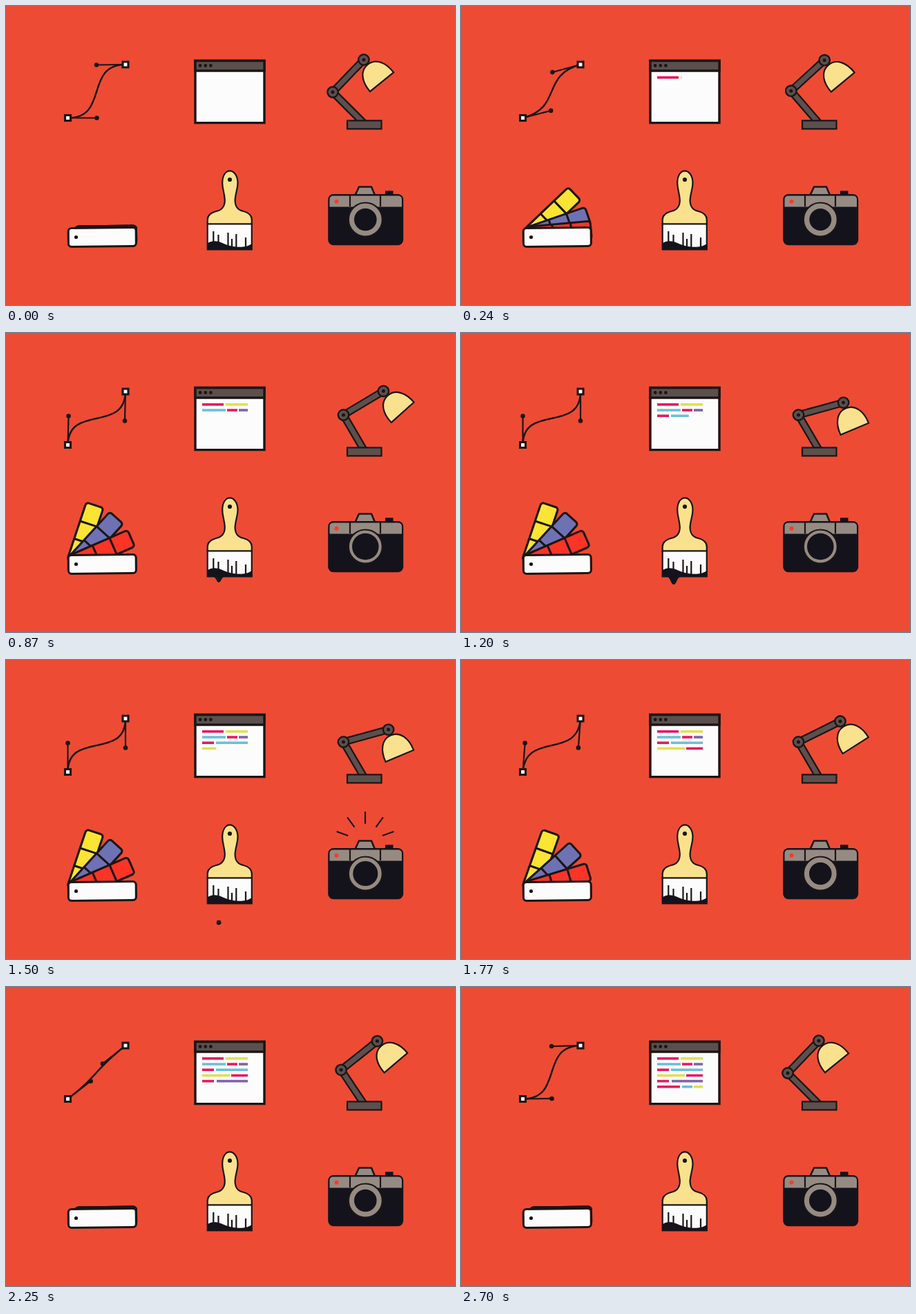
Recreate the animation shown at these times as an HTML page. Size 650x434 px, loop 3 s.

```html
<!DOCTYPE html>
<html lang="en">
<head>
<meta charset="utf-8">
<title>Design tools</title>
<style>
  html, body { margin: 0; height: 100%; overflow: hidden; background: #ee4b34; }
  svg { display: block; width: 650px; height: 434px; }
  .line { fill: none; stroke: #1b1516; stroke-width: 2.2; }
  .ink { fill: #1b1516; }
  .black { fill: #14131c; }
  .white { fill: #fcfcfc; }
  .iron { fill: #5b504d; }
  .cream { fill: #f9e18e; }
  .steel { fill: #968b82; }
  .bold { stroke-width: 3.1; }
</style>
</head>
<body>
<svg viewBox="0 0 650 434">
  <g class="line">
    <path id="curve" stroke-width="2.5"/>
    <path id="handles"/>
    <circle id="endA" class="ink" r="2.2"/>
    <circle id="endB" class="ink" r="2.2"/>
    <path class="white bold" d="M85.5 158.5h8v8h-8zM169 81h8v8h-8z"/>
  </g>

  <g class="line">
    <path class="white" stroke-width="3.4" d="M274 79.5H374V169.6H274z"/>
    <path class="iron" stroke-width="3.4" d="M274 79.5H374V94H274z"/>
    <path class="ink" stroke="none" d="M278.7 86.5a2.4 2.4 0 0 1 4.8 0a2.4 2.4 0 0 1-4.8 0m7.7 0a2.4 2.4 0 0 1 4.8 0a2.4 2.4 0 0 1-4.8 0m7.6 0a2.4 2.4 0 0 1 4.8 0a2.4 2.4 0 0 1-4.8 0"/>
    <g id="code" stroke="none"></g>
  </g>

  <g class="line">
    <path id="shade" class="cream" d="M-22 41.5C-22.5 23-14.5 9 0 9S22.500 23 22 41.500Z"/>
    <path id="armEdge" stroke-width="11.5"/>
    <path id="armFill" stroke="#5b504d" stroke-width="7"/>
    <path class="iron" d="M494 166.3h49.5v12H494z"/>
    <g id="elbow"><circle class="iron" r="7.7" stroke-width="2.4"/><circle class="ink" r="2.5" stroke="none"/></g>
    <g id="wrist"><circle class="iron" r="7.7" stroke-width="2.4"/><circle class="ink" r="2.5" stroke="none"/></g>
  </g>

  <g class="line bold">
    <g id="swatches"></g>
    <rect class="white" x="90.3" y="322" width="98" height="27" rx="4.5" transform="rotate(-.6 139 335)"/>
    <circle class="ink" cx="101.5" cy="335.5" r="2.6" stroke="none"/>
  </g>

  <g class="line">
    <path class="cream" d="M291.7 316.5V310C291.7 303 297 300 304 298C314 296 317 290 316.8 281C316 270 313.2 266 313.2 257C313.2 246 318 239.3 324 239.3S335.5 246 335.5 257C335.5 266 332.5 270 331.6 281C331.4 290 334 296 344 298C351 300 355.8 303 355.8 310V316.5z"/>
    <circle class="ink" cx="324" cy="252" r="3.1" stroke="none"/>
    <path class="white" d="M291.7 316.5H355.8V353.5H291.7z"/>
    <path d="M300.3 327v20M307.5 332v14M321.5 329v20M327 338v12M333.3 331v20M347 336v16"/>
    <path class="black" stroke="none" d="M291.5 344.5C298 340 305 340.5 312 343.5S325 349 333 349.5S349 350 356 345V354H291.5z"/>
    <path id="drip" class="black" stroke="none"/>
    <circle id="drop" class="black" cx="308" stroke="none"/>
  </g>

  <g class="line">
    <path id="flash"/>
    <path class="black" d="M549 268.2h11.5v6H549z" stroke="none"/>
    <path class="steel" stroke-width="2.6" d="M511 262.5H529L534 274.5H505.5z"/>
    <rect class="black" x="466.2" y="273" width="109" height="74.3" rx="8" stroke="none"/>
    <path class="steel" stroke="none" d="M468.5 291.5V281q0-5.5 5.5-5.5H567.5q5.500 0 5.500 5.500V291.500z"/>
    <path d="M498 274V291M542 274V291"/>
    <circle cx="478.5" cy="283.7" r="3" fill="#ff3a26" stroke="none"/>
    <circle class="steel" cx="520.3" cy="310" r="24.5"/>
    <circle id="lens" class="black" cx="520.3" cy="310" stroke="none"/>
  </g>
</svg>
<script>
const $ = id => document.getElementById(id);
const set = (id, attrs) => { for (const k in attrs) $(id).setAttribute(k, attrs[k]); };
const clamp = x => Math.min(1, Math.max(0, x));
const RAD = Math.PI / 180;
const polar = (x, y, r, deg) => [x + r * Math.cos(deg * RAD), y - r * Math.sin(deg * RAD)];

const M = '#e8185e', Y = '#e0e052', C = '#6cc0d8', P = '#8062aa';
const rows = [
  [[M, 284, 315], [Y, 318, 350]],
  [[C, 284, 318], [M, 320, 335], [P, 337, 350]],
  [[M, 284, 301], [C, 304, 350]],
  [[Y, 284, 324], [M, 326, 350]],
  [[M, 284, 301], [P, 305, 350]],
  [[M, 284, 317], [C, 320, 335], [Y, 337, 350]]
];
const swatches = [['#fce434', 71], ['#6e72b4', 47], ['#fb3426', 23]];

$('swatches').innerHTML = swatches.map(([color], i) =>
  `<g id="swatch${i}"><rect y="-13" width="87.5" height="26" rx="4" fill="${color}"/><path d="M32-13v26M59-13v26"/></g>`).join('');

function draw(t) {
  const ease = (from, to) => { const u = clamp((t - from) / (to - from)); return u * u * (3 - 2 * u); };

  // Vector handles: the curve pulls further than the visible handle
  const turn = 90 * (ease(0, 940) - ease(1620, 2760));
  const handle = r => [polar(89.5, 162.5, r, turn), polar(173, 85.5, r, 180 + turn)];
  const [a, b] = handle(42), [pullA, pullB] = handle(60);
  set('curve', { d: `M89.5 162.5C${pullA} ${pullB} 173 85` });
  set('handles', { d: `M89.5 162.5L${a}M173 85L${b}` });
  set('endA', { cx: a[0], cy: a[1] });
  set('endB', { cx: b[0], cy: b[1] });

  // Code lines
  $('code').innerHTML = rows.map((row, i) => {
    const caret = 284 + 66 * clamp((t - 30 - 450 * i) / 390);
    return row.filter(s => s[1] < caret).map(([color, x, end]) =>
      `<rect x="${x}" y="${102 + 8.2 * i}" width="${Math.min(end, caret) - x}" height="3.6" fill="${color}"/>`).join('');
  }).join('');

  // Lamp
  const lean = ease(0, 650) - ease(2055, 2700);
  const lower = ease(0, 750) - ease(1800, 2700);
  const dip = ease(870, 1200);
  const elbow = [473 + 15.5 * lean, 125 - 6 * lean];
  const wrist = polar(...elbow, 65 + 2.5 * lean, 46.3 - 15.4 * lower - 15.5 * (dip - ease(1500, 1920)));
  const tilt = -39 - 3 * lower + 19 * (dip - ease(1500, 2040));
  const arm = `M518.5 170.5L${elbow}L${wrist}`;
  set('armEdge', { d: arm });
  set('armFill', { d: arm });
  set('elbow', { transform: `translate(${elbow})` });
  set('wrist', { transform: `translate(${wrist})` });
  set('shade', { transform: `translate(${wrist}) rotate(${tilt})` });

  // Colour fan
  swatches.forEach(([, angle], i) => {
    const shut = 1740 - 60 * i;
    const open = ease(60 * i, 60 * i + 420) - ease(shut, shut + 420);
    set('swatch' + i, { transform: `translate(101 333) rotate(${-0.6 - angle * open})` });
  });

  // Paint drip
  const sag = ease(570, 1020) - ease(1260, 1440), w = 4 + 8 * sag, tip = 353 + 12 * sag;
  set('drip', { d: `M${308 - w} 353C${308 - w * .3} 354 ${308 - w * .4} ${tip} 308 ${tip}S${308 + w * .3} 354 ${308 + w} 353z` });
  const fall = clamp((t - 1260) / 390);
  set('drop', { cy: 361 + 53 * fall * fall, r: t > 1260 && fall < 1 ? 4 - fall : 0 });

  // Camera
  set('lens', { r: 16.3 - 3.3 * ease(180, 480) + 6.3 * ease(480, 840) - 3 * ease(1380, 1650) });
  const head = 22 + 22 * ease(1320, 1500), tail = 22 + 22 * ease(1440, 1650);
  set('flash', { d: head - tail < .1 ? '' : [20, 54, 90, 126, 160].map(deg =>
    `M${polar(520, 264, tail, deg)}L${polar(520, 264, head, deg)}`).join('') });
}

function tick(now) {
  draw(Math.min(2700, Math.floor(now % 3000 / 30) * 30));
  requestAnimationFrame(tick);
}
requestAnimationFrame(tick);
</script>
</body>
</html>
```
